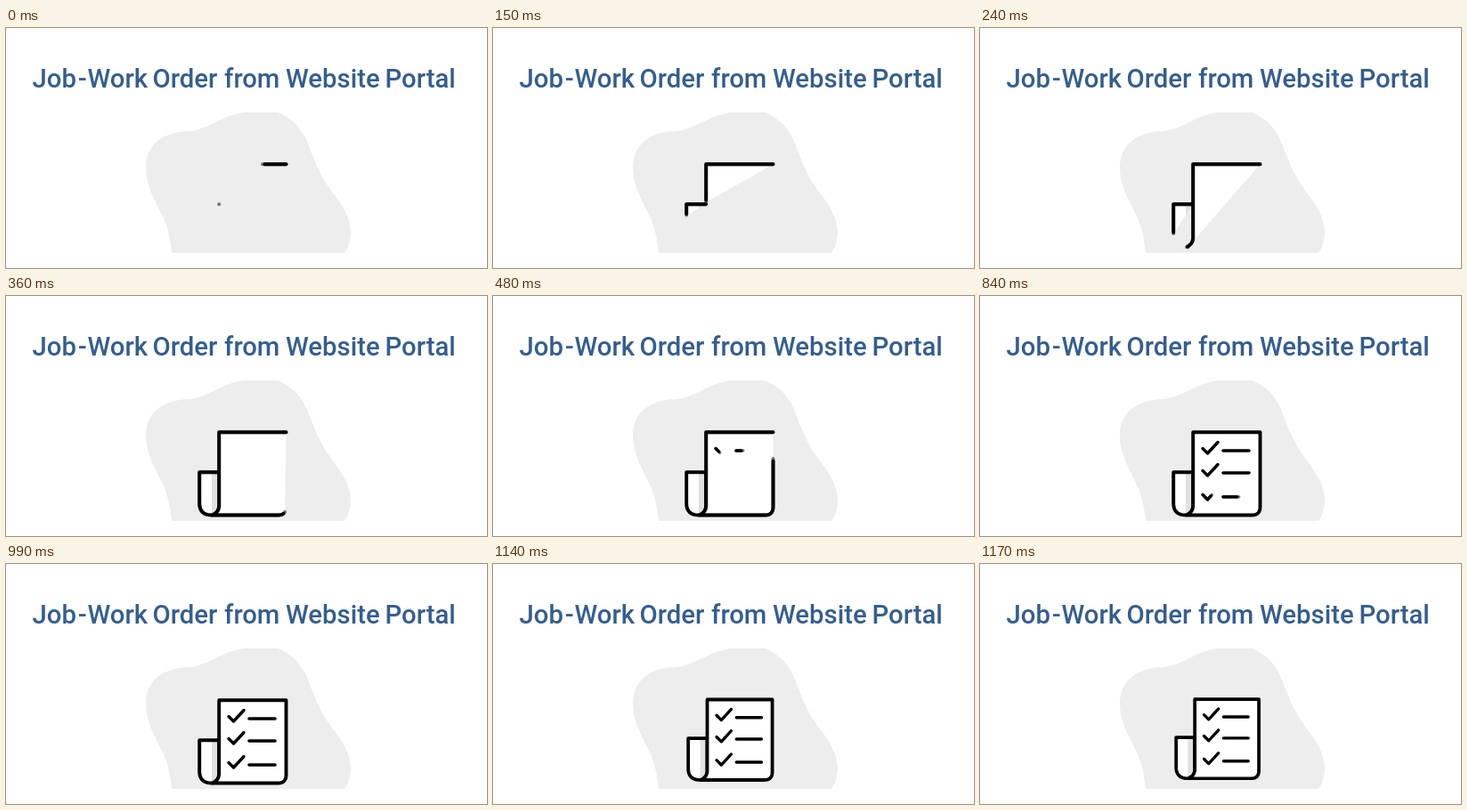
An HTML page with a canvas for the animation above (1.2 s loop, 540 px wide and 270 px high).

```html
<!DOCTYPE html>
<html lang="en">
<head>
<meta charset="utf-8">
<title>Job-Work Order</title>
<style>
html, body { margin: 0; width: 100%; height: 100%; overflow: hidden; background: #fff; }
canvas { display: block; }
</style>
</head>
<body>
<canvas id="stage" width="540" height="270"></canvas>
<script>
const ctx = document.getElementById('stage').getContext('2d');
const LOOP = 1200, STEP = 30;
const clamp = v => Math.max(0, Math.min(1, v));

// Linear interpolation through [time, value] keys.
function keyed(t, keys) {
  for (let i = 1; i < keys.length; i++) {
    const [t0, v0] = keys[i - 1], [t1, v1] = keys[i];
    if (t < t1) return v0 + (v1 - v0) * (t - t0) / (t1 - t0);
  }
  return keys[keys.length - 1][1];
}

// Four-number entries are quadratic curves: control point, then end point.
function flatten(nodes) {
  const points = [];
  for (const [a, b, x, y] of nodes) {
    if (x === undefined) { points.push([a, b]); continue; }
    const [px, py] = points[points.length - 1];
    for (let i = 1; i <= 12; i++) {
      const u = i / 12, w = 1 - u;
      points.push([w * w * px + 2 * w * u * a + u * u * x,
                   w * w * py + 2 * w * u * b + u * u * y]);
    }
  }
  return points;
}

function measure(points) {
  let sum = 0;
  for (let i = 1; i < points.length; i++)
    sum += Math.hypot(points[i][0] - points[i - 1][0], points[i][1] - points[i - 1][1]);
  return sum;
}

function trim(points, length) {
  const path = new Path2D();
  path.moveTo(...points[0]);
  for (let i = 1; i < points.length && length > 0; i++) {
    const [x0, y0] = points[i - 1], [x1, y1] = points[i];
    const part = Math.hypot(x1 - x0, y1 - y0);
    const u = Math.min(1, length / part);
    path.lineTo(x0 + (x1 - x0) * u, y0 + (y1 - y0) * u);
    length -= part;
  }
  return path;
}

// Stroke up to a length, with a faint leading tip while still growing.
function strokeTo(points, length, width, tip) {
  ctx.lineWidth = width;
  const total = measure(points);
  if (length >= total) {
    ctx.stroke(trim(points, total));
    return;
  }
  ctx.globalAlpha = 0.5;
  ctx.stroke(trim(points, length));
  ctx.globalAlpha = 1;
  if (length > tip) ctx.stroke(trim(points, length - tip));
}

const page = flatten([[314.5, 153.2], [239.2, 153.2], [239.2, 236], [239, 243, 232, 246.5],
  [305.5, 246.5], [314.5, 246.5, 314.5, 237], [314.5, 153.2]]);
const curl = flatten([[239.2, 198.2], [217.2, 198.2], [217.2, 233], [217.2, 246.5, 231, 246.5],
  [239.2, 244, 239.2, 236], [239.2, 198.2]]);
const check = [[250, 171.5], [255.5, 177], [267, 164.5]];
const rule = [[273, 174], [302, 174]];

const blob = new Path2D('M186 253C184 236 182 224 175 210C166 192 157 176 157 157' +
  'C157 132 175 117 205 116C229 114 241 98 267 95L305 95C325 103 335 117 342 138' +
  'C350 159 357 173 369 188C382 206 387 217 387 231C386 243 383 249 380 253Z');

function drawTitle() {
  ctx.fillStyle = '#345e90';
  ctx.font = '500 29.3px Roboto, sans-serif';
  const words = [['Job', 29.5], ['-', 81], ['Work', 91.5], ['Order', 164.5],
    ['from', 245], ['Website', 314], ['Portal', 425.5]];
  for (const [word, x] of words) ctx.fillText(word, x, 67);
}

function drawCurl(t) {
  const length = keyed(t, [[0, 0.1], [240, 55], [360, 90], [450, 132]]);
  const shape = trim(curl, length);
  ctx.fillStyle = '#fff';
  ctx.fill(shape);
  ctx.save();
  ctx.clip(shape);
  ctx.fillStyle = '#e0e0e0';
  ctx.fillRect(231, 198, 8, 49);
  ctx.restore();
  strokeTo(curl, length, 3.9, 1.5);
}

function drawPage(t) {
  const length = keyed(t, [[0, 26.5], [240, 173], [360, 254], [480, 314], [600, 350]]);
  ctx.fillStyle = '#fff';
  ctx.fill(trim(page, length));
  strokeTo(page, length, 3.9, 2.5);
}

function drawRow(t, index) {
  const p = clamp((t - 445 - index * 158) / 130);
  if (p === 0) return;
  ctx.save();
  ctx.translate(0, [0, 25, 52][index]);
  strokeTo(check, measure(check) * p, 3.4, 1.5);
  strokeTo(rule, measure(rule) * p, 3.6, 2);
  ctx.restore();
}

function draw(t) {
  ctx.fillStyle = '#fff';
  ctx.fillRect(0, 0, 540, 270);
  drawTitle();
  ctx.fillStyle = '#ededed';
  ctx.fill(blob);

  ctx.save();
  const scale = 1 - 0.045 * clamp((t - 1080) / 90);
  ctx.translate(283, 130);
  ctx.scale(scale, scale);
  ctx.translate(-283, -130);
  ctx.strokeStyle = '#000';
  ctx.lineCap = ctx.lineJoin = 'round';
  drawCurl(t);
  drawPage(t);
  for (let i = 0; i < 3; i++) drawRow(t, i);
  ctx.restore();
}

function tick() {
  const t = performance.now() % LOOP;
  draw(Math.floor(t / STEP) * STEP);
  requestAnimationFrame(tick);
}
tick();
</script>
</body>
</html>
```
